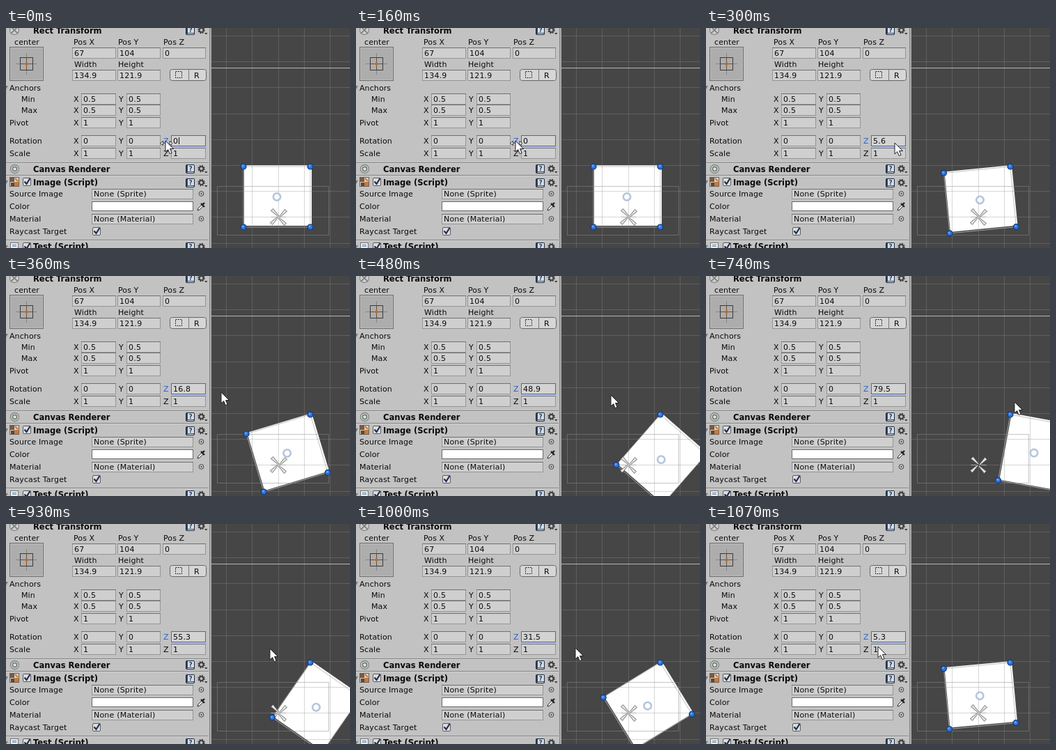
These frames come from a looping animation (494x316 px, 1120 ms). An HTML page:

```html
<!DOCTYPE html>
<html>
<head>
<meta charset="utf-8">
<style>
html, body { margin: 0; height: 100%; overflow: hidden; background: #464646; }
svg { display: block; width: 100vw; height: 100vh; }
text { font: 11px "DejaVu Sans", Verdana, sans-serif; letter-spacing: .1px; fill: #0a0a0a; white-space: pre; }
.bold { font-weight: bold; font-size: 11.5px; letter-spacing: 0; }
.value { letter-spacing: .2px; }
.crisp { shape-rendering: crispEdges; }
</style>
</head>
<body>
<svg id="stage" viewBox="0 0 494 316"></svg>
<script>
const LOOP = 1120;
// time, rotation, pointer x, pointer y
const poses = [
  [0, 0, 229, 162], [230, 1.2, 240, 163], [290, 5.6, 271, 165], [360, 16.8, 309, 167],
  [410, 31.7, 335, 169], [480, 48.9, 366, 171], [550, 62.8, 398, 174], [610, 71.4, 422, 177],
  [670, 77.3, 438, 180], [740, 79.5, 443, 181], [820, 75.9, 434, 181], [870, 68.9, 415, 180],
  [930, 55.3, 379, 179], [1000, 31.5, 315, 178], [1070, 5.3, 247, 176]
];

const text = (x, y, s, cls = "", more = "") => `<text x="${x}" y="${y}" class="${cls}" ${more}>${s}</text>`;
const box = (x, y, w, h, fill, more = "") =>
  `<rect x="${x}" y="${y}" width="${w}" height="${h}" fill="${fill}" ${more}/>`;
const path = (d, stroke, width = 1, fill = "none", more = "") =>
  `<path d="${d}" stroke="${stroke}" stroke-width="${width}" fill="${fill}" ${more}/>`;
const ring = (x, y, r, stroke, width = 1, fill = "none") =>
  `<circle cx="${x}" cy="${y}" r="${r}" stroke="${stroke}" stroke-width="${width}" fill="${fill}"/>`;
const at = (x, y, s) => `<g transform="translate(${x} ${y})">${s}</g>`;

const field = (x, y, w, s, h = 16) =>
  box(x + .5, y + .5, w - 1, h - 1, "#cfcfcf", 'stroke="#959595"') +
  path(`M${x} ${y + .5}h${w}`, "#707070") +
  text(x + 3, y + h - 4, s, "value");
const axes = (y, a, b) =>
  text(97, y + 12, "X") + field(108, y, 50, a) + text(162, y + 12, "Y") + field(173, y, 49, b);

const check = (x, y) =>
  box(x + .5, y + .5, 11, 11, "#dedede", 'rx="1.5" stroke="#5c5c5c"') +
  path(`M${x + 2.5} ${y + 5.5}l3 3.5l5 -8`, "#1d2c50", 2.2);

// Help book, gear and small menu arrow
const tools = y => at(258, y,
  box(.5, -6.5, 12, 12, "#33465e", 'rx="1" stroke="#1c2a3d"') +
  box(3, -6, 9, 9, "#d5dde8") + path("M2.5 4.5h9", "#e8e8e8") +
  text(4.5, 2, "?", "bold", 'style="font-size:9px;fill:#26405f"') +
  `<circle cx="22.5" cy="-1" r="4.2" fill="none" stroke="#3a3a3a" stroke-width="2" stroke-dasharray="1.8 1.5"/>` +
  ring(22.5, -1, 2.9, "#3a3a3a", 1.8) +
  path("M27 3h4.5l-2.2 2.6z", "none", 0, "#333"));

const divider = y => path(`M0 ${y + .5}h291`, "#858585") + path(`M0 ${y + 1.5}h291`, "#d2d2d2");
const foldout = y => path(`M-4 ${y - 3}h7l-3.5 6z`, "none", 0, "#777");

function anchors() {
  return box(5.5, 27.5, 48, 48, "#adadad", 'stroke="#6c6c6c"') +
    box(6.5, 28.5, 46, 46, "none", 'stroke="#bdbdbd"') +
    path("M29.5 36v31M14 51.5h31", "#858585") +
    box(20.5, 42.5, 18, 18, "none", 'stroke="#3b3b3b"') +
    path("M29.5 43v17M21 51.5h17", "#6a5038") +
    path("M29.5 48.5l3 3l-3 3l-3 -3z", "none", 0, "#b76b2b");
}

function buttons() {
  return box(235.5, 59.5, 52, 16, "#d6d6d6", 'rx="3" stroke="#666"') +
    path("M262.5 60v15", "#777") +
    box(243.5, 62.5, 9, 9, "none", 'stroke="#222" stroke-dasharray="2 1.3"') +
    text(270, 71.5, "R");
}

function panel() {
  const rectIcon = ring(12, 3, 6.5, "#8a8a8a", 1.3, "#cfcfcf") +
    path("M7 -2l10 10M17 -2l-10 10", "#777", 1.6);
  const rendererIcon = ring(12.5, 202.5, 6, "#7f8983", 1.3, "#cbd0cc") +
    ring(12.5, 202.5, 3, "#69766e", 1.5, "#e0e3e0");
  const imageIcon = box(5.5, 214.5, 13, 13, "#d8d0c5", 'stroke="#6c6257"') +
    box(6, 215, 6, 6, "#7b5a42") + box(12, 221, 6, 6, "#c9793a") +
    box(7, 222, 5, 5, "#4f4a46") + path("M13 216l4 4", "#c9793a", 2);
  const scriptIcon = box(6.5, 308.5, 11, 12, "#ececec", 'stroke="#777"') +
    path("M9 311.5h6M9 313.5h6", "#5f87a8");
  const dropper = path("M275 262l1 -3l5 -5l2 2l-5 5z", "#333", 1, "#eee") +
    path("M280 252l5 5M282 254l3 -3", "#222", 2.4);
  const picker = y => ring(280.5, y, 3.4, "#444") + ring(280.5, y, 1, "none", 0, "#333");

  return `<g class="crisp">${box(0, 0, 292, 316, "#c2c2c2")}${box(292, 0, 1, 316, "#858585")}
    ${box(293, 0, 2, 316, "#aaa")}${[193, 211, 304].map(divider).join("")}</g>` +
    rectIcon + text(39, 8, "Rect Transform", "bold") + [4, 203, 223, 315].map(tools).join("") +
    text(30, 24, "center", "", 'text-anchor="middle"') + anchors() + buttons() +
    text(97, 24, "Pos X") + text(161, 24, "Pos Y") + text(226, 24, "Pos Z") +
    field(95, 28, 63, "67") + field(160, 28, 62, "104") + field(225, 28, 62, "0") +
    text(98, 56, "Width") + text(161, 56, "Height") +
    field(95, 60, 63, "134.9") + field(160, 60, 62, "121.9") +
    foldout(86) + text(5, 90, "Anchors") +
    text(22, 106, "Min") + axes(94, "0.5", "0.5") +
    text(22, 122, "Max") + axes(110, "0.5", "0.5") +
    text(5, 140, "Pivot") + axes(128, "1", "1") +
    text(5, 166, "Rotation") + axes(154, "0", "0") +
    text(226, 166, "Z", "", 'style="fill:#2f64c8"') +
    box(237.5, 154.5, 49, 15, "#d3d3d3", 'stroke="#3f66cf"') +
    text(240, 166, "", "value", 'id="angle"') +
    `<path id="caret" d="M248.5 157v10" stroke="#111"/>` +
    text(5, 184, "Scale") + axes(172, "1", "1") + text(226, 184, "Z") + field(237, 172, 50, "1") +
    rendererIcon + text(39, 207, "Canvas Renderer", "bold") +
    foldout(222) + imageIcon + check(24, 215) + text(39, 226, "Image (Script)", "bold") +
    text(5, 242, "Source Image") + field(123, 231, 146, "None (Sprite)", 15) + picker(238) +
    text(5, 260, "Color") + box(123.5, 249.5, 145, 13, "#fff", 'stroke="#6b6b6b"') + dropper +
    text(5, 278, "Material") + field(123, 267, 146, "None (Material)", 15) + picker(274) +
    text(5, 296, "Raycast Target") + check(124, 286) +
    foldout(315) + scriptIcon + check(24, 308) + text(39, 318, "Test (Script)", "bold");
}

function gizmo() {
  const arm = "M1 -1L9 -11L12 -8L2 0z";
  const arms = [0, 90, 180, 270].map(a =>
    path(arm, "#555", .8, "#e4e4e4", `transform="rotate(${a})"`)).join("");
  return at(391.5, 271.5, arms + path("M-11 0h8M3 0h8", "#b0b0b0", 1.2));
}

function grid() {
  let d = "";
  for (let i = 0; i < 5; i++) d += `M${Math.round(316 + i * 37.3) + .5} 0v316`;
  for (let i = 0; i < 9; i++) d += `M295 ${Math.round(11 + i * 37.2) + .5}h199`;
  return path(d, "rgba(140,140,140,.35)");
}

const handle = `<g class="handle">${ring(0, 0, 4, "#143a7c", 1.2, "#2f74d6")}${ring(-.8, -1, 1.5, "none", 0, "#69a2ec")}</g>`;

const stage = document.getElementById("stage");
stage.innerHTML =
  `<g id="sheet">${box(-97, 0, 97, 87, "#fff")}</g>` +
  `<g id="frame">${box(-96, 0, 96, 87, "none", 'stroke="#b9b4b4" stroke-width=".8"')}</g>` +
  grid() + path("M303.5 227.5h160v70h-160z", "rgba(140,140,140,.5)") +
  path("M295 57.5h199", "#b6b6b6") +
  gizmo() + handle.repeat(4) +
  `<g id="middle">${ring(0, 0, 5.2, "#b5c5dc", 2.6, "rgba(255,255,255,.6)")}</g>` +
  panel() +
  `<g id="pointer"><g id="drag">${path("M-3.5 0.5v6l-4 -3zM6 0.5v6l4 -3z", "#222", .9, "#fff")}</g>` +
  path("M0 0v16l3.7 -3.4l2.5 6l2.9 -1.2l-2.6 -5.9h5z", "#222", 1, "#fff") + "</g>";

const byId = id => document.getElementById(id);
const handles = [...document.querySelectorAll(".handle")];
const place = (el, x, y, turn = 0) =>
  el.setAttribute("transform", `translate(${x} ${y}) rotate(${turn})`);

function draw() {
  const t = performance.now() % LOOP;
  const [start, angle, x, y] = poses.filter(p => p[0] <= t).pop();
  const rad = angle * Math.PI / 180, c = Math.cos(rad), s = Math.sin(rad);
  const put = (el, u, v) => place(el, 437 + u * c + v * s, 199 - u * s + v * c);

  place(byId("sheet"), 439, 197, -angle);
  place(byId("frame"), 437, 199, -angle);
  handles.forEach((h, i) => put(h, i % 2 ? -96 : 0, i > 1 ? 87 : 0));
  put(byId("middle"), -48, 43.5);
  place(byId("pointer"), x, y);
  byId("angle").textContent = angle;
  byId("caret").style.display = t < 160 ? "" : "none";
  byId("drag").style.display = start ? "none" : "";
  requestAnimationFrame(draw);
}
draw();
</script>
</body>
</html>
```
